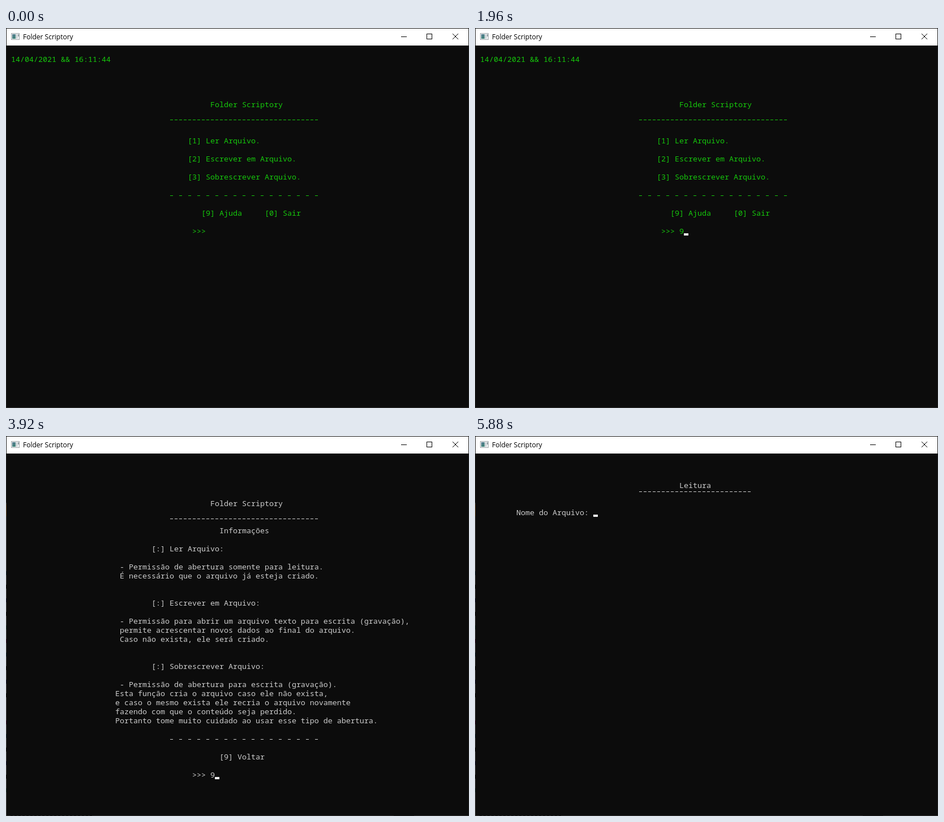
An HTML page with a canvas that plays this animation: 818 by 672 pixels, repeating every 6860 ms.

```html
<!DOCTYPE html>
<html lang="pt">
<head>
<meta charset="utf-8">
<title>Folder Scriptory</title>
<style>
html, body { margin: 0; width: 100%; height: 100%; overflow: hidden; background: #0c0c0c; }
canvas { display: block; }
</style>
</head>
<body>
<canvas id="stage" width="818" height="672"></canvas>
<script>
const ctx = document.getElementById('stage').getContext('2d', { alpha: false });
const W = 818, H = 672, STEP = 980;
const CELL_W = 8, CELL_H = 16, LEFT = 1, TOP = 31;
const NAME = 'Folder Scriptory';
const GREEN = '#16c60c', GREY = '#cccccc';

const colX = col => LEFT + col * CELL_W;
const rowY = row => TOP + row * CELL_H;

function rect(x, y, w, h, color) {
  ctx.fillStyle = color;
  ctx.fillRect(x, y, w, h);
}

function print(row, col, text, color) {
  ctx.fillStyle = color;
  ctx.fillText(text, colX(col), rowY(row) + 13);
}

function rule(row, count, dy, stride, color) {
  for (let i = 0; i < count; i += stride) {
    rect(colX(36 + i) + 1, rowY(row) + dy, 5, 1, color);
  }
}
const solidRule = (row, count, color) => rule(row, count, 3, 1, color);
const looseRule = (row, color) => rule(row, 33, 9, 2, color);

function cursor(row, col) {
  rect(colX(col), rowY(row) + 12, CELL_W, 4, '#f2f2f2');
}

function prompt(row, typed, showCursor, color) {
  print(row, 41, '>>> ' + typed, color);
  if (showCursor) cursor(row, 45 + typed.length);
}

function menu(clock, typed, showCursor) {
  print(1, 1, '14/04/2021 && ' + clock, GREEN);
  print(6, 45, NAME, GREEN);
  solidRule(8, 33, GREEN);
  print(10, 40, '[1] Ler Arquivo.', GREEN);
  print(12, 40, '[2] Escrever em Arquivo.', GREEN);
  print(14, 40, '[3] Sobrescrever Arquivo.', GREEN);
  looseRule(16, GREEN);
  print(18, 43, '[9] Ajuda     [0] Sair', GREEN);
  prompt(20, typed, showCursor, GREEN);
}

const HELP = [
  [5, 45, NAME],
  [8, 47, 'Informações'],
  [10, 32, '[:] Ler Arquivo:'],
  [12, 25, '- Permissão de abertura somente para leitura.'],
  [13, 25, 'É necessário que o arquivo já esteja criado.'],
  [16, 32, '[:] Escrever em Arquivo:'],
  [18, 25, '- Permissão para abrir um arquivo texto para escrita (gravação),'],
  [19, 25, 'permite acrescentar novos dados ao final do arquivo.'],
  [20, 25, 'Caso não exista, ele será criado.'],
  [23, 32, '[:] Sobrescrever Arquivo:'],
  [25, 25, '- Permissão de abertura para escrita (gravação).'],
  [26, 24, 'Esta função cria o arquivo caso ele não exista,'],
  [27, 24, 'e caso o mesmo exista ele recria o arquivo novamente'],
  [28, 24, 'fazendo com que o conteúdo seja perdido.'],
  [29, 24, 'Portanto tome muito cuidado ao usar esse tipo de abertura.'],
  [33, 47, '[9] Voltar']
];

function help(typed) {
  for (const [row, col, text] of HELP) print(row, col, text, GREY);
  solidRule(7, 33, GREY);
  looseRule(31, GREY);
  prompt(35, typed, true, GREY);
}

function reading() {
  print(3, 45, 'Leitura', GREY);
  solidRule(4, 25, GREY);
  print(6, 9, 'Nome do Arquivo:', GREY);
  cursor(6, 26);
}

function titleBar() {
  rect(1, 1, W - 2, 30, '#ffffff');

  rect(9, 9, 15, 12, '#a3a9ac');
  rect(10, 10, 13, 10, '#eef1f2');
  const pane = ctx.createLinearGradient(11, 11, 16, 19);
  pane.addColorStop(0, '#5b7f96');
  pane.addColorStop(1, '#3f8577');
  rect(11, 11, 6, 8, pane);
  rect(18, 11, 2, 8, '#c3cacd');
  rect(21, 11, 2, 4, '#9aa4a9');

  ctx.font = '12px "Open Sans", "Noto Sans", sans-serif';
  ctx.fillStyle = '#000000';
  ctx.fillText(NAME, 30, 20);

  rect(698, 15, 10, 1, '#000000');
  ctx.strokeStyle = '#000000';
  ctx.lineWidth = 1;
  ctx.strokeRect(743.5, 10.5, 9, 9);
  ctx.beginPath();
  ctx.moveTo(789, 10);
  ctx.lineTo(799, 20);
  ctx.moveTo(799, 10);
  ctx.lineTo(789, 20);
  ctx.stroke();
}

// The one-pixel window border lets the desktop behind shine through.
function border(overEditor) {
  rect(0, 0, W, 1, '#181818');
  rect(0, 0, 1, H, '#202020');
  rect(W - 1, 0, 1, H, '#202020');
  rect(0, H - 1, W, 1, '#303030');
  if (!overEditor) return;
  rect(0, 118, 1, H - 118, '#4b4b4b');
  rect(0, 121, 1, 21, '#6a5030');
  const tints = ['#20303c', '#171717', '#202038', '#171717', '#284038', '#401830'];
  for (let i = 0; i < 17; i++) {
    if (i !== 10) rect(0, 239 + i * 24, 1, 7, tints[i % tints.length]);
  }
  for (let x = 8; x < 150; x += 7) rect(x, H - 1, 4, 1, '#151515');
  rect(685, H - 1, 36, 1, '#1c1c1c');
}

const SCENES = [
  () => menu('16:11:44', '', false),
  () => menu('16:11:44', '', true),
  () => menu('16:11:44', '9', true),
  () => help(''),
  () => help('9'),
  () => menu('16:16:35', '1', false),
  reading
];

function draw(time) {
  const scene = Math.floor(time / STEP) % SCENES.length;
  rect(0, 0, W, H, '#0c0c0c');
  border(scene >= 4);
  titleBar();
  ctx.font = '13.333px "Noto Sans Mono", "DejaVu Sans Mono", monospace';
  SCENES[scene]();
}

const start = performance.now();
function tick() {
  draw(performance.now() - start);
  requestAnimationFrame(tick);
}
tick();
</script>
</body>
</html>
```
